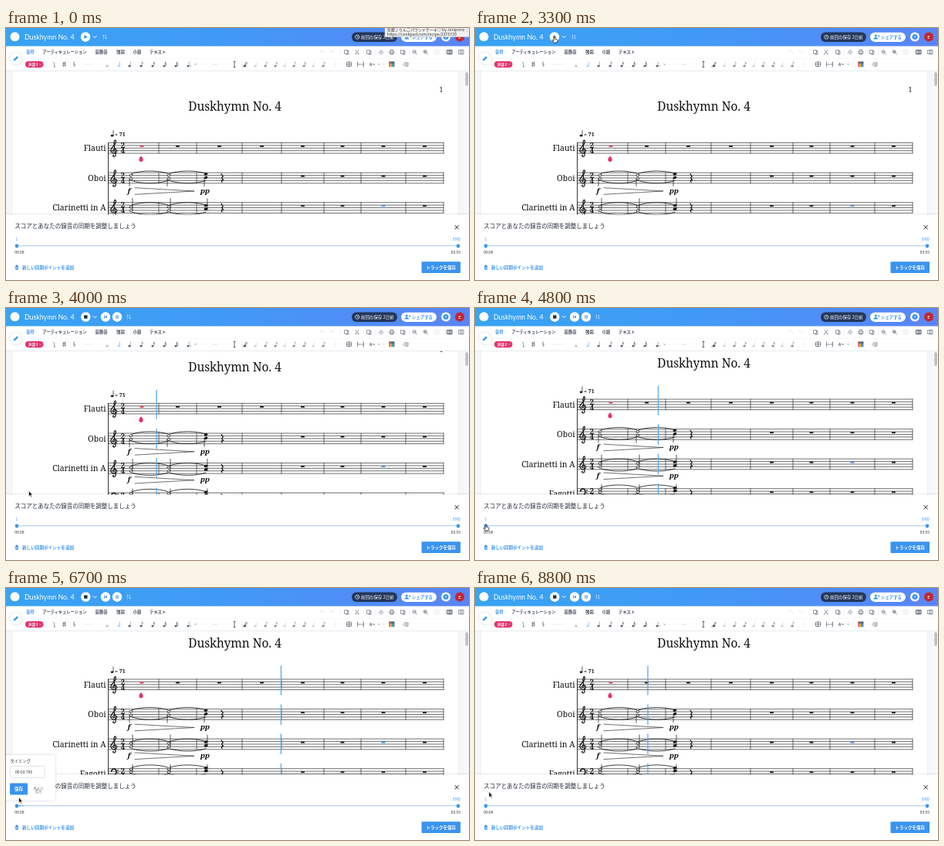
Write an HTML page that moves like this. It is 600x326 px and loops after 8900 ms.

```html
<!DOCTYPE html>
<html lang="ja">
<head>
<meta charset="utf-8">
<title>Score sync</title>
<style>
html, body { margin: 0; width: 100%; height: 100%; overflow: hidden; background: #fff; }
svg { display: block; width: 600px; height: 326px; font-family: "Noto Sans CJK JP", "Noto Sans CJK", "Noto Sans", sans-serif; }
.serif { font-family: "Noto Serif", "Liberation Serif", serif; }
.lato { font-family: Lato, "Open Sans", sans-serif; }
.line { fill: none; stroke-linecap: round; stroke-linejoin: round; }
.b { font-weight: 700; }
.m { font-weight: 500; }
.x { font-weight: 900; }
</style>
</head>
<body>
<svg id="stage" viewBox="0 0 600 326" xmlns="http://www.w3.org/2000/svg"></svg>
<script>
const LOOP = 8900, STEP = 100;
const PLAY = 3400, POPUP = 6000, SAVED = 7800;
const BLUE = '#3b94ef', INK = '#111', GREY = '#4b5563', PINK = '#e3326b';
const TITLE = 'Duskhymn No. 4';
const bars = [172, 198, 247, 306, 357, 412, 460, 518, 567];

// Drawing helpers
const text = (x, y, size, s, fill = INK, cls = '', anchor = 'start') =>
  `<text x="${x}" y="${y}" font-size="${size}" fill="${fill}" class="${cls}" text-anchor="${anchor}">${s}</text>`;
const rect = (x, y, w, h, fill, r = 0, extra = '') =>
  `<rect x="${x}" y="${y}" width="${w}" height="${h}" rx="${r}" fill="${fill}" ${extra}/>`;
const circle = (x, y, r, fill, extra = '') => `<circle cx="${x}" cy="${y}" r="${r}" fill="${fill}" ${extra}/>`;
const line = (d, color = INK, w = 0.7) => `<path class="line" d="${d}" stroke="${color}" stroke-width="${w}"/>`;
const shape = (d, fill) => `<path d="${d}" fill="${fill}"/>`;
const at = (x, y, s, id = '') => `<g ${id && `id="${id}"`} transform="translate(${x} ${y})">${s}</g>`;
const group = (id, s) => `<g id="${id}">${s}</g>`;

// Score
function head(x, y, hollow) {
  return `<ellipse cx="${x}" cy="${y}" rx="2.1" ry="1.3" transform="rotate(-20 ${x} ${y})"
    fill="${hollow ? '#fff' : INK}" stroke="${INK}" stroke-width=".8"/>`;
}
function staff(y, bass) {
  let d = 'M132.500 -6.800V6.800';
  for (let i = -2; i <= 2; i++) d += `M132.500 ${i * 3.4}H567`;
  for (const x of bars.slice(1)) d += `M${x} -6.800V6.800`;
  const treble = 'M-.6 4.600C-2.400 3.600-1.200 1 .8 1C3 1 4 3 3.400 4.800C2.600 7-.8 7.400-2.800 5.600' +
    'C-5 3.400-3.600.2-1.400-2C1-4.400 2.600-6 2.400-8.600C2.200-10.600 1-10.600.4-9' +
    'C-.6-6.400 0-4 .6-.6L2 8C2.400 10.400 1 11.400-.6 11C-1.600 10.600-1.600 9.400-.6 9';
  const low = 'M-3 -3.400C-4-7 3-8 3-3C3 2-1 4.500-3.500 6M5 -5v.1M5 -1.800v.1';
  return at(0, y, line(d, '#222', 0.65) + at(140, 0, line(bass ? low : treble, INK, bass ? 1.6 : 1.2)) +
    ['2', '4'].map((n, i) => text(151.5, i * 6.8 - 0.1, 9.5, n, INK, 'serif x', 'middle')).join(''));
}
function rests(y, from, special = {}) {
  return bars.slice(from, -1).map((x, i) => {
    const mid = from + i ? (x + bars[from + i + 1]) / 2 : 176;
    return rect(mid - 2.4, y - 3.2, 4.8, 1.8, special[from + i] || INK);
  }).join('');
}
function phrase(y, heads, stem, dyn) {
  let s = '';
  [162, 211, 259].forEach((x, i) => {
    const side = stem > 0 ? -2 : 2;
    s += line(`M${x + side} ${heads[1]}V${stem}`, INK, 0.7);
    s += heads.map(h => head(x, h - (i === 2 ? 1.7 : 0), i < 2)).join('');
    if (i < 2) {
      const [a, b] = [x + 1, x + 48], top = heads[0] - 2.3, low = heads[1] + 2.3;
      s += line(`M${a} ${top}C${a + 13} ${top - 4.4} ${b - 13} ${top - 4.4} ${b} ${top}`, INK, 0.8);
      s += line(`M${a} ${low}C${a + 13} ${low + 4.4} ${b - 13} ${low + 4.4} ${b} ${low}`, INK, 0.8);
    }
  });
  s += line('M279 -5.200L281.300 -2Q279.600 -.4 279.700 .2L281.600 2.700Q278 2.200 280 5.300', INK, 1.2);
  s += line(`M167 ${dyn - 4.3}L244 ${dyn}L167 ${dyn + 4.3}`, INK, 0.6);
  const mark = (x, t) => `<g font-style="italic">${text(x, dyn + 2.8, 9.6, t, INK, 'serif b', 'middle')}</g>`;
  return at(0, y, s + mark(159.5, 'f') + mark(258, 'pp'));
}
function score() {
  const staves = [155.3, 194, 232.5, 271];
  const names = ['Flauti', 'Oboi', 'Clarinetti in A', 'Fagotti'];
  let s = text(296.5, 107.3, 15.4, TITLE, INK, 'serif', 'middle') +
    text(564, 82.5, 8, '1', INK, 'serif', 'middle') +
    `<ellipse cx="137.500" cy="139.200" rx="1.800" ry="1.300" fill="${INK}"/>` +
    line('M139 139V132.500', INK, 0.7) + text(141, 140.4, 7, '= 71', INK, 'serif b') +
    line('M132.500 148.500V278', '#222', 0.9);
  staves.forEach((y, i) => {
    s += staff(y, i === 3) + text(129.5, y + 3.8, 10.4, names[i], INK, 'serif', 'end');
    s += rests(y, i ? 4 : 0, i ? (i === 2 ? { 6: '#4b86e8' } : {}) : { 0: '#e8334f' });
  });
  s += phrase(194, [-3.4, 1.2], 10.5, 17) + phrase(232.5, [-1.2, 3.4], -12, 15.3) +
    phrase(271, [-6, -2.2], -12, 15.3);
  s += shape('M175 165.500C177 168 177.600 169 177.600 170.300A2.600 2.600 0 0 1 172.400 170.300C172.400 169 173 168 175 165.500Z', PINK);
  const spans = [[131.5, 168.5], [181.5, 207], [219.5, 245], [258, 284]];
  s += at(0, 0, line(spans.map(([a, b]) => `M0 ${a}V${b}`).join(''), '#55aaee', 1.3), 'head');
  return s;
}

// Top bar
const button = (x, icon) => circle(x, 11.5, 6.2, '#fff') + at(x, 11.5, icon);
const loopIcon = x => at(x, 11.5, line('M-1.500 2.500V-2.500M-2.700 -1.300L-1.500 -2.500L-.3 -1.300M1.500 -2.500V2.500M.3 1.300L1.500 2.500L2.700 1.300', '#b9dafb', 0.7));
function header() {
  const tri = shape('M-1.700 -2.600L2.800 0L-1.700 2.600Z', BLUE);
  return rect(0, 0, 600, 23.5, 'url(#bar)') + circle(11.5, 11.3, 6, '#fff') +
    text(24, 14.9, 8.8, TITLE, '#fff', 'lato') +
    line('M113.200 10.600L115.200 12.600L117.200 10.600', '#fff', 1) +
    group('idle', button(103, tri) + loopIcon(128)) +
    group('playing', button(103.3, rect(-2.2, -2.2, 4.4, 4.4, '#1d3150')) +
      button(129, shape('M1.900 -2.100V2.100L-1 0Z', BLUE) + rect(-1.9, -2.1, 0.9, 4.2, BLUE)) +
      button(144, rect(-1.7, -2.2, 1.2, 4.4, BLUE) + rect(0.5, -2.2, 1.2, 4.4, BLUE)) + loopIcon(159)) +
    rect(448, 5.5, 59, 12.5, '#22375a', 6.2) + circle(455.3, 11.7, 2.6, 'none', 'stroke="#fff" stroke-width=".7"') +
    line('M455.300 10.200V11.800H456.500', '#fff', 0.6) + text(460, 13.8, 5.5, '前回の保存 2日前', '#fff', 'm') +
    rect(512, 5.7, 46, 12.2, '#fff', 6.1) + circle(519.3, 10, 1.5, BLUE) +
    shape('M516.500 14.500Q516.500 12 519.300 12Q522 12 522 14.500Z', BLUE) +
    line('M522 10.500H524.400M523.200 9.300V11.700', BLUE, 0.7) +
    text(526, 13.7, 5.4, 'シェアする', BLUE, 'b') +
    circle(570, 11.6, 6, '#fff') + circle(570, 11.6, 3.5, BLUE) + text(570, 13.6, 5.5, '?', '#fff', 'lato b', 'middle') +
    circle(588, 11.6, 6, '#c3252c') + text(588, 13.8, 6, 'E', '#fff', 'lato', 'middle') +
    group('tip', rect(491, -1, 110, 12.6, '#f1f1f1', 0, 'stroke="#bbb" stroke-width=".5"') +
      text(494, 4.1, 5, '気軽♪りんごパウンドケーキ♡ by Juniperia ｜…', '#333') +
      text(494, 9.9, 5.2, 'https://cookpad.com/recipe/2375729', '#333'));
}
function note(x, flags, color = GREY, hollow) {
  let s = `<ellipse cx="${x}" cy="49.200" rx="1.400" ry="1" fill="${hollow ? 'none' : color}" stroke="${color}" stroke-width=".4"/>`;
  if (flags >= 0) s += line(`M${x + 1.3} 49V44`, color, 0.5);
  for (let i = 0; i < flags; i++) s += line(`M${x + 1.3} ${44 + i * 1.3}l1.500 1.600`, color, 0.55);
  return s;
}
function tools() {
  const tabs = [[26, '音符'], [47.5, 'アーティキュレーション'], [115.5, '装飾音'], [143, '強弱'], [164.5, '小節'], [186, 'テキスト']];
  let s = rect(0, 23.5, 600, 32, '#fff') + rect(0, 39, 600, 0.5, '#eef0f3') + rect(0, 55, 600, 0.6, '#dfe3e8');
  tabs.forEach(([x, t], i) => s += text(x, 32.9, i === 1 ? 5.25 : 5.4, t, i ? '#4a5261' : BLUE, 'b'));
  s += rect(25, 43, 23.5, 8.2, PINK, 4.1) + text(29, 48.7, 4.4, '声部 2', '#fff', 'b') +
    line('M43.500 46.600l1 1l1-1', '#fff', 0.6);
  s += line('M61.500 44l1.500 2q-1 1 0 2l.5 1.500q-2-.5-1 1.500M74.500 44v6M76.500 43.500v6M73.500 46l4-.8M73.500 48.600l4-.8M88 43.500v6q3-2 0-3.500', GREY, 0.6);
  s += line('M102 47h3.500M107.500 47h4', '#dde1e6', 0.8);
  s += note(131, -1, GREY, true) + note(146, 0, BLUE, true);
  [160, 175, 190, 205, 220].forEach((x, i) => s += note(x, i));
  s += note(236, 0) + circle(239.5, 49, 0.6, GREY) + line('M244.500 46.500l1 1l1-1', GREY, 0.6);
  s += line('M252 47h.1M256 47h.1M268 47h6', '#d5d9df', 0.8);
  s += line('M295 43.500h2M296 43.500v7M295 50.500h2', '#333b48', 0.8) + note(309.5, 0, '#333b48') + line('M307 50.500l6-6', '#333b48', 0.7);
  [323, 336, 349, 361, 373, 386, 398, 411].forEach((x, i) => s += note(x, i % 3, i % 3 ? '#7d8591' : '#c8cdd4'));
  s += rect(426, 43, 0.5, 8, '#dde1e6') + rect(441.5, 44, 6, 5.5, 'none', 0.5, `stroke="${GREY}" stroke-width=".7"`) +
    line('M444.500 44v5.500M441.500 46.800h6M455.500 44v6M459 47h-2.500M460.500 47h2.500M463.500 44v6', GREY, 0.7) +
    text(471, 49, 4.8, 'A⁺ᵃ', GREY, 'b') + line('M482.500 46.500l1 1l1-1', GREY, 0.6) + line('M489.500 43.500v7', '#dde1e6', 0.5);
  ['#e5484d', '#f5a623', '#3fa66b', '#3b7de0'].forEach((c, i) => s += rect(496.5 + i * 1.7, 43.5, 1.8, 6.8, c));
  s += rect(496.5, 43.5, 6.8, 2.4, '#30384a', 0, 'opacity=".5"');
  s += line('M515 47l2-2.200h4v4.400h-4ZM517.500 46l2 2M519.500 46l-2 2', GREY, 0.6);

  const undo = 'M-2.500 -.5Q0 -3 2.500 1M-2.500 -2.500V-.5H-.5';
  const box = 'M-2 -2.500H1.500V2H-2ZM0 2V3H3V-1.500H1.500';
  const lens = 'M1.200 -.5A2 2 0 1 1 -2.800 -.5A2 2 0 1 1 1.200 -.5M.7 1L2.700 3M-1.800 -.5H.2';
  const cloud = 'M-2 1.500Q-3.500 0 -1.500 -1Q0 -3.500 1.800 -1Q3.600 0 2 1.500M0 0V3';
  const print = 'M-1.500 -1V-3H1.500V-1M-2.800 -1H2.800V1.500H-2.800ZM-1.500 1V3H1.500V1';
  const cut = 'M-2 -2.500L1.500 2M2 -2.500L-1.500 2M-2.500 2.300h1M1.500 2.300h1';
  const keys = 'M-3 -2.500H3V2.500H-3ZM-1 -2.500V2.500M1 -2.500V2.500';
  [[410, undo, 1], [423, undo, 1], [441, box], [455, cut], [470, box], [486, cloud], [500, print],
    [514, box], [530, lens], [544, lens + 'M-.8 -1.500V.5'], [558, keys, 1], [575, keys], [590, keys]]
    .forEach(([x, d, dim]) => s += at(x, 31.2, line(d, dim ? '#dfe2e7' : GREY, x === 575 ? 1 : 0.6)));
  s += rect(433, 28, 0.5, 7, '#dde1e6') + rect(478, 28, 0.5, 7, '#dde1e6') + rect(522, 28, 0.5, 7, '#dde1e6');
  return s + circle(13, 39.3, 7.6, '#fff', 'filter="url(#soft)"') +
    shape('M9.900 42.500L10.400 40.300L14.300 36.400L16 38.100L12.100 42Z', BLUE);
}

// Bottom panel
const pin = x => circle(x, 281.7, 2.3, BLUE) + shape(`M${x - 2.2} 282.300H${x + 2.2}L${x} 285Z`, BLUE);
function panel() {
  return rect(0, 241.5, 600, 90, '#fff', 0, 'filter="url(#soft)"') +
    text(11.3, 259.4, 7.5, 'スコアとあなたの録音の同期を調整しましょう', '#222933', 'm') +
    line('M581.800 255.400l4.600 4.600M586.400 255.400l-4.600 4.600', '#222', 1) +
    text(14, 275.3, 5, '1', BLUE, 'm', 'middle') + text(589, 275.3, 5, 'END', BLUE, 'm', 'end') +
    line('M14 281.700H586', '#a6c6e8', 1.1) + group('stretch', line('M14 281.700H22', '#6db0f2', 1.2)) +
    pin(14) + pin(586) +
    `<text id="start" x="11.300" y="291.500" font-size="4.900" fill="#333" class="m"></text>` +
    text(589, 291.5, 4.9, '03:59', '#333', 'm', 'end') +
    shape('M14 306L16.600 309L14 310.200L11.400 309Z', BLUE) + shape('M11.400 310L14 311.300L16.600 310L16 312L14 313L12 312Z', BLUE) +
    text(21, 311.6, 5.6, '新しい同期ポイントを追加', BLUE, 'b') +
    rect(538.5, 302.3, 50.5, 14.7, BLUE, 1) + text(563.8, 311.6, 5.5, 'トラックを保存', '#fff', 'b', 'middle');
}
function popup() {
  return rect(-3, 216, 66.5, 58.5, '#fff', 1, 'filter="url(#soft)"') +
    text(5.5, 225.8, 5.3, 'タイミング', '#333', 'm') +
    rect(5.3, 230.5, 44.8, 14.8, '#fff', 1, 'stroke="#d3d9e0" stroke-width=".7"') +
    text(12, 239.9, 5, '00:03.785', '#333') +
    rect(5, 252.5, 23, 15, BLUE, 1) + text(16.5, 262, 5.6, '保存', '#fff', 'b', 'middle') +
    text(42, 259.6, 4.4, 'キャン', '#555', '', 'middle') + text(42, 264.4, 4.4, 'セル', '#555', '', 'middle') +
    line('M36 260.600h12M38 265.400h8', '#888', 0.35);
}
const arrow = `<path d="M0 0V7.200L1.700 5.700L2.900 8.300L4 7.800L2.900 5.300H5Z" fill="#111" stroke="#fff" stroke-width=".6"/>`;
const hand = `<path d="M-.8 0Q0 -.8 .8 0V2.600L3.500 3.300Q4.200 3.600 4 4.600L3.300 7.500H-.8L-2.800 4.800Q-2.900 3.900 -2 4.100L-.8 5Z" fill="#fff" stroke="#111" stroke-width=".75"/>`;

const stage = document.getElementById('stage');
stage.innerHTML = `<defs>
  <linearGradient id="bar"><stop stop-color="#38a4f3"/><stop offset=".5" stop-color="#4298f7"/><stop offset="1" stop-color="#5b84f6"/></linearGradient>
  <filter id="soft" x="-20%" y="-20%" width="140%" height="140%"><feDropShadow dx="0" dy="0" stdDeviation="1.500" flood-color="#000" flood-opacity=".22"/></filter>
  <clipPath id="view"><rect y="55.500" width="600" height="187"/></clipPath></defs>` +
  rect(0, 55, 600, 190, '#f6f7f9') + rect(7.5, 55, 579, 190, '#fff', 0, 'stroke="#e3e6ea" stroke-width=".6"') +
  `<g clip-path="url(#view)">${group('score', score())}</g>` +
  rect(594, 56, 6, 186, '#fafafa') + rect(595.2, 57, 3.8, 18, '#c2c2c2', 1.9) +
  tools() + header() + panel() + group('popup', popup()) +
  group('cursor', group('arrow', arrow) + group('hand', hand));

// Animation
const $ = id => document.getElementById(id);
const show = (id, on) => $(id).style.display = on ? '' : 'none';
const move = (id, x, y) => $(id).setAttribute('transform', `translate(${x.toFixed(2)} ${y.toFixed(2)})`);
const path = [[400, 569, -12], [500, 562, 16], [600, 320, 24], [700, 88, 20], [900, 103, 11.5], [3500, 103, 11.5],
  [3700, 70, 120], [4000, 29.5, 236.5], [4600, 14, 280.5], [5300, 14, 280.5], [5800, 14, 282.5], [6200, 14, 283],
  [7000, 18, 263.5], [LOOP, 18, 263.5]];

function cursorAt(t) {
  const i = path.findIndex(p => p[0] > t);
  if (i < 1) return path[0].slice(1);
  const [a, b] = [path[i - 1], path[i]], k = (t - a[0]) / (b[0] - a[0]);
  return [a[1] + (b[1] - a[1]) * k, a[2] + (b[2] - a[2]) * k];
}
// Every bar takes the same time, whatever its width.
function headAt(t) {
  const pos = t < SAVED ? 0.886 + (t - 4000) / 870 : 1.53 + (t - 8800) / 870;
  const i = Math.floor(pos);
  return bars[i] + (bars[i + 1] - bars[i]) * (pos - i);
}
function draw(now) {
  const t = Math.floor(now % LOOP / STEP) * STEP;
  const playing = t >= PLAY;
  const k = Math.min(1, Math.max(0, (t - 3500) / 690));
  move('score', 0, -30.5 * (1 - Math.cos(Math.PI * k)) / 2);
  show('head', playing);
  if (playing) move('head', headAt(t), 0);
  show('idle', !playing);
  show('playing', playing);
  show('tip', t < 200);
  const open = t >= POPUP && t < SAVED;
  show('popup', open);
  show('stretch', open);
  $('start').textContent = t < SAVED ? '00:00' : '00:04';
  const [x, y] = cursorAt(t);
  move('cursor', x, y);
  const pointing = (t >= 900 && t <= 3500) || (t >= 4600 && t <= 6200) || (t >= 6900 && t < SAVED);
  show('hand', pointing);
  show('arrow', !pointing);
}
const began = performance.now();
function tick() {
  draw(performance.now() - began);
  requestAnimationFrame(tick);
}
tick();
</script>
</body>
</html>
```
